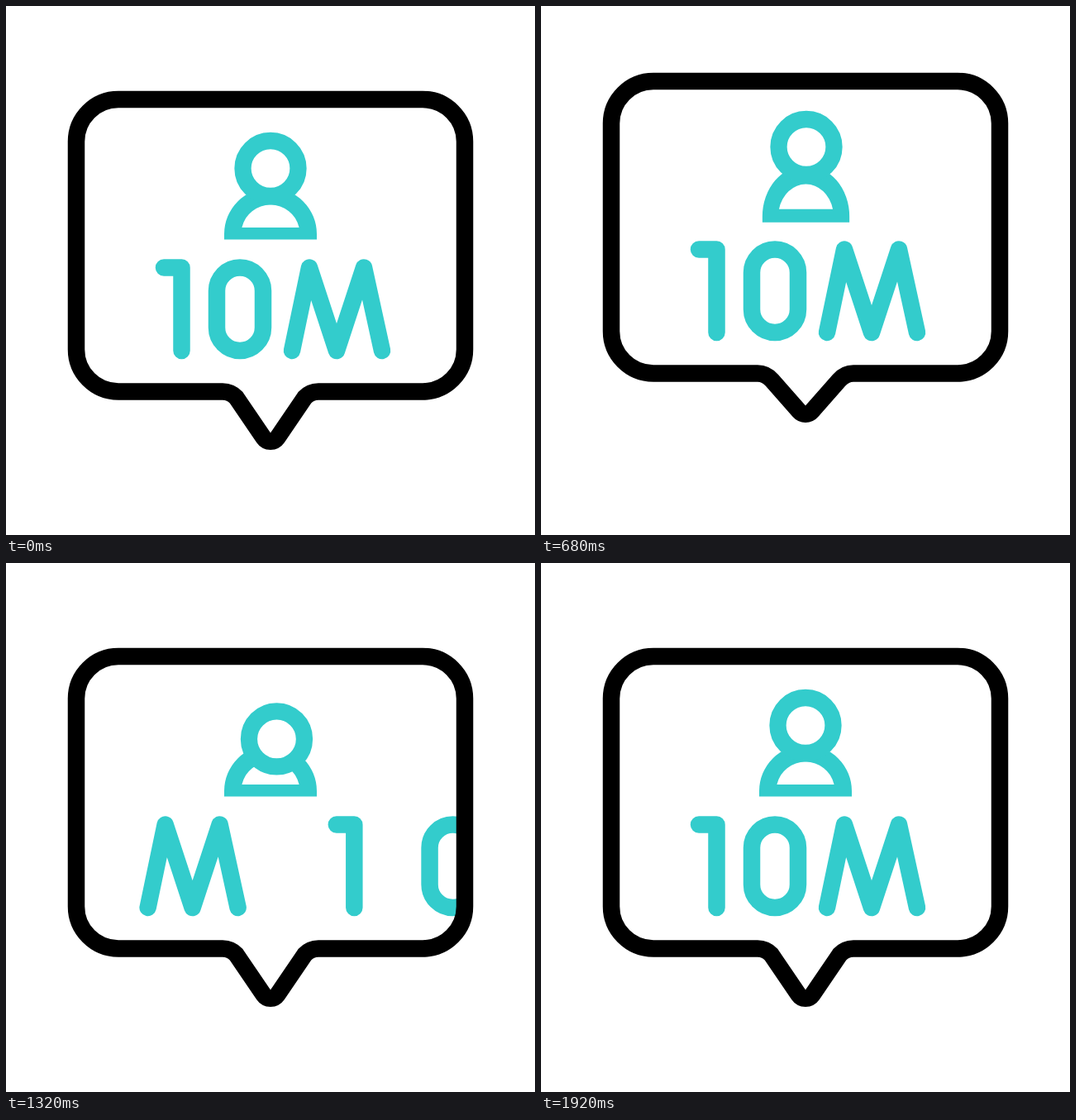
Write an HTML page that moves like this. It is 640 by 640 pixels and loops after 2000 ms.

```html
<!DOCTYPE html>
<html lang="en">
<head>
<meta charset="utf-8">
<title>10M followers</title>
<style>
  html, body { margin: 0; width: 100%; height: 100%; overflow: hidden; background: #fff; }
  svg { display: block; width: 100vw; height: 100vh; }
  .line { fill: none; stroke-width: 20.5; stroke-linecap: round; stroke-linejoin: round; }
</style>
</head>
<body>
<svg viewBox="0 0 640 640">
  <defs>
    <clipPath id="inside"><rect x="88" y="290" width="464" height="150"/></clipPath>
    <path id="one" d="M191 316.5H212.5V417"/>
    <rect id="zero" x="255" y="316.5" width="56" height="100.5" rx="28"/>
    <path id="million" d="M346 417L367 316.5L400 417L433 316.5L455 417"/>
  </defs>
  <g id="scene">
    <path id="body" fill="#33cccc" fill-rule="evenodd"
      d="M264 282.5V276A56 56 0 0 1 376 276V282.5ZM285.4 268A35.5 35.5 0 0 1 354.6 268Z"/>
    <circle id="head" r="33.5" fill="#fff" stroke="#33cccc" stroke-width="20.3"/>
    <g id="word" class="line" stroke="#33cccc" clip-path="url(#inside)"></g>
    <path id="bubble" class="line" stroke="#000"/>
  </g>
</svg>
<script>
const LOOP = 2000, STEP = 40, LAST = 1920;
const $ = id => document.getElementById(id);

const ease = x => {
  x = Math.min(1, Math.max(0, x));
  return x * x * (3 - 2 * x);
};

// Eased value through [time, value] keys
function track(t, keys) {
  let value = keys[0][1];
  for (let i = 1; i < keys.length; i++) {
    const [t0, v0] = keys[i - 1], [t1, v1] = keys[i];
    if (t >= t0) value = v0 + (v1 - v0) * ease((t - t0) / (t1 - t0));
  }
  return value;
}

// Rest, low point (held briefly), high point, rest
const bounce = (t, rest, low, high) =>
  track(t, [[0, rest], [280, low], [320, low], [560, high], [800, rest]]);

const headX = [[800, 0], [1060, -13], [1460, 15.5], [1880, 0]];
const headY = [[800, 0], [1120, 16.5], [1300, 16.5], [1900, 0]];

// Every glyph leaves to the right while its twin arrives from the left
const glyphs = [];
function addGlyph(id, keys) {
  const node = document.createElementNS("http://www.w3.org/2000/svg", "use");
  node.setAttribute("href", "#" + id);
  $("word").append(node);
  glyphs.push({ node, keys });
}
[["one", 394, 955, 1920], ["zero", 486, 565, 1875], ["million", 555, 447, 1831]]
  .forEach(([id, exit, entry, end]) => {
    addGlyph(id, [[800, 0], [1800, exit]]);
    addGlyph(id, [[632, -entry], [end, 0]]);
  });

function bubblePath(stretch) {
  const r = 10.2, dx = 33, dy = 48.5 + stretch, len = Math.hypot(dx, dy);
  const nx = dy / len * r, ny = dx / len * r;
  const shoulder = dx + nx, shoulderY = 468 + ny;
  const tipY = 516.5 + stretch + ny;
  return `M136 113H504A51 51 0 0 1 555 164V415.5A51 51 0 0 1 504 466.5H378
    Q368 466.5 ${320 + shoulder} ${shoulderY}L${320 + nx} ${tipY}
    A${r} ${r} 0 0 1 ${320 - nx} ${tipY}L${320 - shoulder} ${shoulderY}
    Q272 466.5 262 466.5H136A51 51 0 0 1 85 415.5V164A51 51 0 0 1 136 113Z`;
}

function draw(t) {
  const lift = bounce(t, 0, 40, -44);
  $("scene").setAttribute("transform", `translate(0 ${lift})`);
  $("bubble").setAttribute("d", bubblePath(lift / 2));

  const sx = bounce(t, 1, 0.988, 0.88), sy = bounce(t, 1, 1.05, 1.2);
  const shift = bounce(t, 0, 1, 1);
  $("body").setAttribute("transform",
    `translate(${320 + shift} 270) scale(${sx} ${sy}) translate(-320 -270)`);

  $("head").setAttribute("cx", 320 + bounce(t, 0, 0, 2) + track(t, headX));
  $("head").setAttribute("cy", 196.5 + bounce(t, 0, 15.5, -8) + track(t, headY));

  for (const { node, keys } of glyphs) node.setAttribute("x", track(t, keys));
}

let start;
function frame(now) {
  start ??= now;
  const t = (now - start) % LOOP;
  draw(Math.min(LAST, Math.floor(t / STEP) * STEP));
  requestAnimationFrame(frame);
}
draw(0);
requestAnimationFrame(frame);
</script>
</body>
</html>
```
